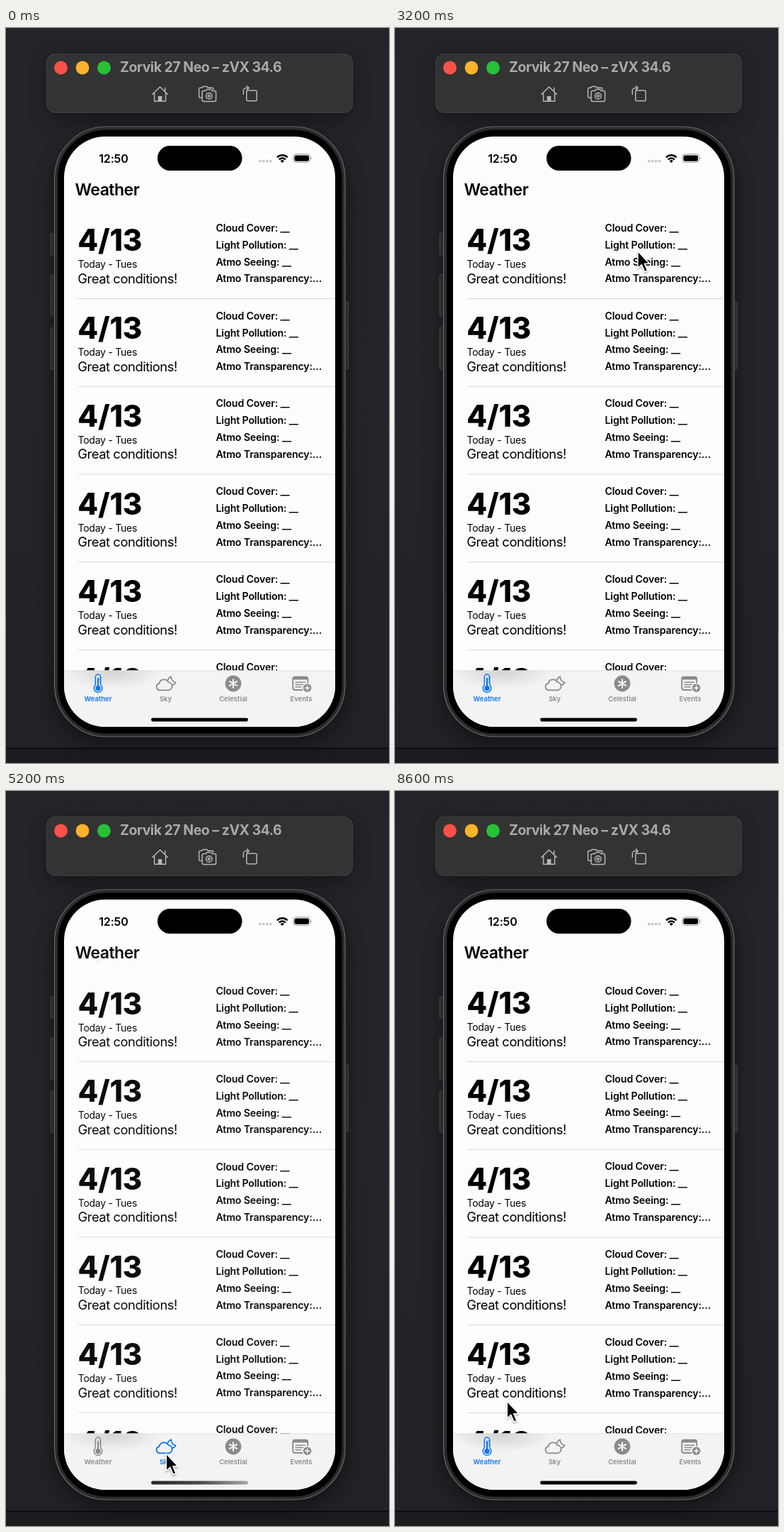
An HTML page for the animation above (8700 ms loop, 541 px wide and 1036 px high).

```html
<!DOCTYPE html>
<html lang="en">
<head>
<meta charset="utf-8">
<title>Weather app demo</title>
<style>
html, body { margin: 0; width: 100%; height: 100%; overflow: hidden; background: #232429; }
svg { display: block; width: 100%; height: 100%; }
text { font-family: Inter, "Open Sans", sans-serif; white-space: pre; }
.title { font-size: 23px; font-weight: 600; letter-spacing: -.5px; }
.date { font-size: 42px; font-weight: 800; letter-spacing: -.3px; }
.day { font-size: 14px; letter-spacing: -.25px; }
.cond { font-size: 18.4px; letter-spacing: -.45px; }
.info { font-size: 14.2px; font-weight: 600; letter-spacing: -.15px; }
.tab text { font-size: 9.5px; font-weight: 600; text-anchor: middle; fill: currentColor; }
.line { fill: none; stroke: currentColor; stroke-linecap: round; stroke-linejoin: round; }
.fill { fill: currentColor; }
</style>
</head>
<body>
<svg id="stage" viewBox="0 0 541 1036" xmlns="http://www.w3.org/2000/svg"></svg>
<script>
const LOOP = 8700, STEP = 100;
const PITCH = 123.8, DETAIL_H = 140, SPLIT = 381.5;
const BLUE = '#0a76f2', GREY = '#8b8b8c';

const text = (x, y, cls, s) => `<text x="${x}" y="${y}" class="${cls}">${s}</text>`;
const rect = (x, y, w, h, r, attrs) =>
  `<rect x="${x}" y="${y}" width="${w}" height="${h}" rx="${r}" ${attrs}/>`;
const dot = (x, y, r, attrs) => `<circle cx="${x}" cy="${y}" r="${r}" ${attrs}/>`;

const defs = `<defs>
  <linearGradient id="desk" x2="0" y2="1">
    <stop offset="0" stop-color="#22242a"/><stop offset=".5" stop-color="#24252a"/><stop offset="1" stop-color="#212226"/>
  </linearGradient>
  <linearGradient id="pill"><stop offset="0" stop-color="#252525"/><stop offset=".5" stop-color="#4a4a4a"/><stop offset="1" stop-color="#a5a5a5"/></linearGradient>
  <radialGradient id="smudge"><stop offset="0" stop-color="#000" stop-opacity=".13"/><stop offset="1" stop-color="#000" stop-opacity="0"/></radialGradient>
  <filter id="soft" x="-30%" y="-30%" width="160%" height="160%"><feGaussianBlur stdDeviation="14"/></filter>
  <filter id="drop" x="-50%" y="-50%" width="200%" height="200%"><feDropShadow dx="0" dy="1.5" stdDeviation="1.3" flood-opacity=".4"/></filter>
  <clipPath id="listClip"><rect x="82" y="153" width="383" height="752.5"/></clipPath>
  <clipPath id="barClip"><path d="M82 905.5H465V927A58 58 0 0 1 407 985H140A58 58 0 0 1 82 927Z"/></clipPath>
  <clipPath id="detailClip"><rect id="detailBox" x="82" y="${SPLIT}" width="383" height="0"/></clipPath>
</defs>`;

const desk = `
  <rect width="541" height="1036" fill="url(#desk)"/>
  <rect y="1015" width="541" height="21" fill="#1b1c1f"/>
  <rect y="1014.5" width="541" height="1.6" fill="#08080a"/>
  ${rect(60, 46, 427, 84, 14, 'fill="#000" opacity=".35" filter="url(#soft)"')}
  ${rect(66, 150, 416, 860, 78, 'fill="#000" opacity=".45" filter="url(#soft)"')}`;

const toolbar = `
  ${rect(56, 35, 435, 85.5, 13, 'fill="#0c0c0d"')}
  ${rect(57, 36, 433, 83.5, 12, 'fill="#333334" stroke="#505052" stroke-width=".7"')}
  ${dot(77.5, 56, 9.4, 'fill="#fb5149"')}
  ${dot(108, 56, 9.4, 'fill="#fdb32b"')}
  ${dot(138.5, 56, 9.4, 'fill="#27c138"')}
  <text x="161" y="62.3" fill="#a9a9aa" font-size="19.5" font-weight="700" letter-spacing="-.5">Zorvik 27 Neo – zVX 34.6</text>
  <g class="line" color="#b6b6b7" stroke-width="1.5">
    <path d="M206.8 93.5 217.6 83 228.4 93.5M209.6 91.5V103.2H225.6V91.5M224.7 88.5V84.2"/>
    <path class="fill" stroke="none" d="M214.8 96H220.4V103.5H214.8Z"/>
    <path d="M276.5 98.2H274.5A2 2 0 0 1 272.6 96.2V86.2A2 2 0 0 1 274.6 84.2H276.6L278 82.6H284L285.4 84.2H291A2 2 0 0 1 293 86.2"/>
    <path d="M279.3 88.5H282.2L284 86.5H289.6L291.4 88.5H294.4A2.2 2.2 0 0 1 296.6 90.7V101.2A2.2 2.2 0 0 1 294.4 103.4H279.3A2.2 2.2 0 0 1 277.1 101.2V90.7A2.2 2.2 0 0 1 279.3 88.5Z"/>
    ${dot(286.8, 95.7, 4.3, '')}
    ${dot(286.8, 95.7, 1.5, '')}
    ${rect(339.8, 88, 14.4, 14.8, 2, '')}
    <path d="M335.3 93.5V88.5A4 4 0 0 1 339.3 84.5H343M340.3 81.8 343.2 84.5 340.3 87.2"/>
  </g>`;

const button = (x, y, w, h) => rect(x, y, w, h, 1.5, 'fill="#2c2c2e" stroke="#48484a" stroke-width=".8"');
const phone = `
  ${button(63, 289.5, 8, 30.5)}${button(63, 347.5, 8, 58.5)}${button(63, 422.5, 8, 58.5)}${button(476, 386.5, 7.5, 94)}
  ${rect(67.5, 138, 412.5, 862, 74, 'fill="#101011"')}
  ${rect(68.5, 139, 410.5, 860, 73, 'fill="#2b2b2c" stroke="#6b6b6c" stroke-width="1.2"')}
  ${rect(73, 143.5, 401.5, 851, 68, 'fill="#000"')}
  ${rect(82, 153, 383, 832, 58, 'fill="#fdfdfd"')}`;

const status = `
  ${rect(214, 166, 119.5, 35, 17.5, 'fill="#000"')}
  <text x="131.3" y="189.5" font-size="16" font-weight="600" letter-spacing="-.2">12:50</text>
  ${[358.8, 363.7, 368.6, 373.5].map(x => dot(x, 187.6, 1.9, 'fill="#c6c6c6"')).join('')}
  <g fill="none" stroke="#000" stroke-width="2.5">
    <path d="M383 182.4A10.2 10.2 0 0 1 397.6 182.4"/>
    <path d="M385.8 185.5A6.2 6.2 0 0 1 394.8 185.5"/>
  </g>
  <path d="M390.3 190 387.7 187.4A3.7 3.7 0 0 1 392.9 187.4Z"/>
  ${rect(405.8, 177.8, 23.8, 11.6, 3.8, 'fill="none" stroke="#999" stroke-width="1"')}
  ${rect(407.4, 179.4, 20.6, 8.4, 2.4, '')}
  <path d="M430.7 181.7A2.2 2.2 0 0 1 430.7 185.5Z" fill="#999"/>`;

const labels = ['Cloud Cover: __', 'Light Pollution: __', 'Atmo Seeing: __', 'Atmo Transparency:…'];
const details = ['Sunrise: 6:30am  |  Sunset: 8pm', 'Wind: 2 mph  |  North', 'Temp: 72', 'Humidity: 10%', 'Percipitation: 4%'];

const row = i => `<g transform="translate(0 ${i * PITCH})">
  ${text(101.3, 314.3, 'date', '4/13')}
  ${text(101.5, 338.3, 'day', 'Today - Tues')}
  ${text(101.3, 359.8, 'cond', 'Great conditions!')}
  ${labels.map((s, n) => text(296.5, 286.9 + n * 23.85, 'info', s)).join('')}
  <path d="M101.5 ${SPLIT}H465" stroke="#dadada"/>
</g>`;

const names = ['Weather', 'Sky', 'Celestial', 'Events'];
const pageTitle = n => text(97.5, 235.7, 'title', names[n]);
const pages = `
  <g clip-path="url(#listClip)">
    <g id="page0">
      ${pageTitle(0)}
      ${row(0)}
      <g clip-path="url(#detailClip)"><g id="details">
        ${details.map((s, n) => text(120.5, SPLIT + 27.2 + n * 23.85, 'info', s)).join('')}
      </g></g>
      <g id="rest">${[1, 2, 3, 4, 5].map(row).join('')}</g>
    </g>
  </g>
  ${[1, 2, 3].map(n => `<g id="page${n}">${pageTitle(n)}</g>`).join('')}
  <g id="bar" clip-path="url(#barClip)">
    <rect x="82" y="905.5" width="383" height="80" fill="#f3f3f3"/>
    <ellipse cx="150" cy="908" rx="72" ry="24" fill="url(#smudge)"/>
    <path d="M82 905.8H465" stroke="#d5d5d5"/>
  </g>`;

const icons = [
  `<path class="line" stroke-width="1.5" d="M126.3 926V914.8A3.7 3.7 0 0 1 133.7 914.8V926A5.8 5.8 0 1 1 126.3 926Z"/>
   ${dot(130, 930.6, 3.7, 'class="fill"')}
   <path class="line" stroke-width="2.2" d="M130 930V917"/>
   <path class="line" stroke-width=".9" d="M132 915.5H133.5M132 918.5H133.5M132 921.5H133.5"/>`,
  `<path class="line" stroke-width="1.8" d="M217 933.3A4.7 4.7 0 0 1 216.4 924A6.9 6.9 0 0 1 229.4 922.2A5.6 5.6 0 0 1 230 933.3Z"/>
   <path class="line" stroke-width="1.7" d="M228.6 919A7.5 7.5 0 0 1 233.3 914.2A7.4 7.4 0 0 0 239.8 922.3A7.6 7.6 0 0 1 234.8 926.2"/>`,
  `${dot(321, 924, 11.4, 'class="fill"')}
   <path stroke="#fff" stroke-width="2" stroke-linecap="round" d="M321 918.2V929.8M316 921.1 326 926.9M316 926.9 326 921.1"/>`,
  `${rect(405.2, 914.6, 21, 18.4, 3, 'class="line" stroke-width="1.9"')}
   <path class="fill" d="M405 918V916.6A2.5 2.5 0 0 1 407.5 914H424A2.5 2.5 0 0 1 426.5 916.6V918.6H405Z"/>
   <path class="line" stroke-width="1.5" d="M409 922.2H422.5M409 925.5H420M409 928.8H417"/>
   ${dot(425.6, 930.2, 7, 'fill="#f8f8f8"')}${dot(425.6, 930.2, 5.8, 'class="fill"')}
   <path stroke="#fff" stroke-width="1.4" stroke-linecap="round" d="M422.6 930.2H428.6M425.6 927.2V933.2"/>`
];
const tabs = icons.map((art, n) =>
  `<g id="tab${n}" class="tab">${art}<text x="${[130, 225.5, 321, 417][n]}" y="948.7">${names[n]}</text></g>`).join('');

const pointer = `<path id="cursor" filter="url(#drop)" stroke="#fff" stroke-width="1.5" stroke-linejoin="round"
  d="M.3 0V24.2L5.7 19.2 10.1 29.3 14 27.6 9.8 17.8H16.8Z"/>`;

const $ = id => document.getElementById(id);
$('stage').innerHTML = defs + desk + toolbar + phone + pages + status + tabs +
  rect(205, 972.6, 137, 4.9, 2.45, 'id="home"') + pointer;

const ramp = (t, from, len) => {
  const p = Math.min(1, Math.max(0, (t - from) / len));
  return p * p * (3 - 2 * p);
};

// time, x, y of the pointer tip
const path = [
  [1800, 440, 330], [2100, 336, 301], [2400, 330, 305], [2900, 331, 306], [3400, 349, 319],
  [4050, 349, 319], [4400, 318, 470], [5000, 226, 934], [6000, 226, 934], [6200, 319, 928],
  [6450, 319, 928], [6800, 417, 930], [7350, 417, 930], [7900, 147, 931], [8250, 142, 931], [8600, 158, 860]
];
// start time and tab of each switch
const switches = [[-1000, 0], [5170, 1], [6140, 2], [7040, 3], [8100, 0]];

function pointerAt(t) {
  const i = path.findIndex(k => k[0] > t);
  if (i < 0) return path[path.length - 1].slice(1);
  const [a, b] = [path[i - 1], path[i]];
  const e = ramp(t, a[0], b[0] - a[0]);
  return [a[1] + (b[1] - a[1]) * e, a[2] + (b[2] - a[2]) * e];
}

function setPage(n, alpha) {
  const s = 1 - .006 * Math.sqrt(1 - alpha);
  $('page' + n).setAttribute('opacity', alpha);
  $('page' + n).setAttribute('transform', `translate(273.5 569) scale(${s}) translate(-273.5 -569)`);
}

function draw(t) {
  const now = switches.filter(s => s[0] <= t).length - 1;
  const [start, current] = switches[now];
  const previous = now ? switches[now - 1][1] : -1;
  const e = ramp(t, start, 220);
  for (let n = 0; n < 4; n++) {
    const alpha = n === current ? e : n === previous ? 1 - e : 0;
    setPage(n, alpha);
    $('tab' + n).setAttribute('color', n === current ? BLUE : GREY);
    if (!n) $('bar').setAttribute('opacity', alpha);
  }

  const h = DETAIL_H * (ramp(t, 3600, 280) - ramp(t, 4000, 280));
  $('detailBox').setAttribute('height', h);
  $('details').setAttribute('transform', `translate(0 ${h - DETAIL_H})`);
  $('rest').setAttribute('transform', `translate(0 ${h})`);

  $('home').setAttribute('fill', t >= 5200 && t < 5400 ? 'url(#pill)' : '#000');

  const shown = t >= path[0][0];
  $('cursor').setAttribute('visibility', shown ? 'visible' : 'hidden');
  if (shown) $('cursor').setAttribute('transform', `translate(${pointerAt(t)})`);
}

function tick() {
  const t = performance.now() % LOOP;
  draw(Math.floor(t / STEP) * STEP);
  requestAnimationFrame(tick);
}
tick();
</script>
</body>
</html>
```
